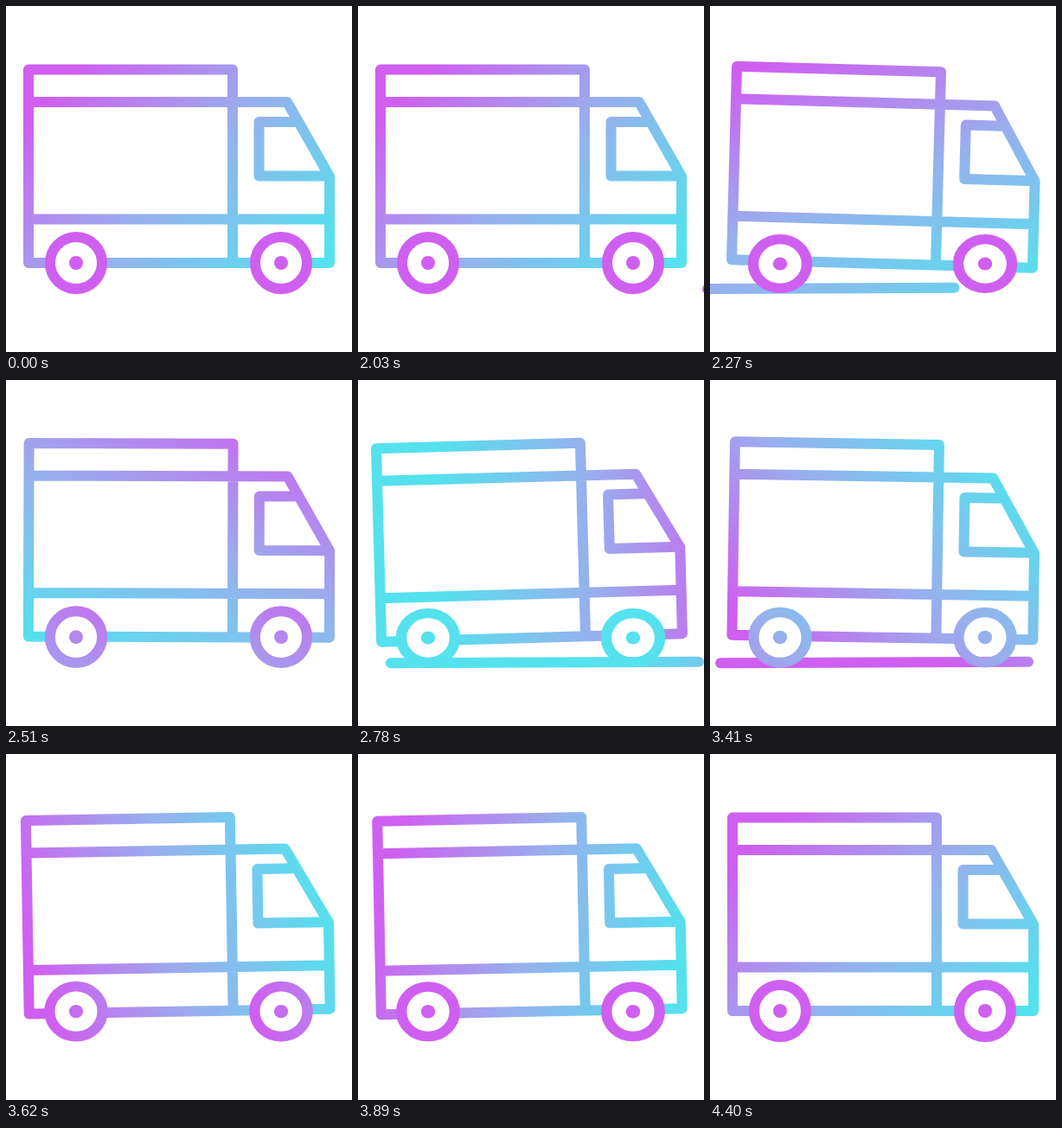
Recreate the animation shown at these times as an HTML page. Size 400 px wide and 400 px high, loop 4430 ms.

```html
<!DOCTYPE html>
<html lang="en">
<head>
<meta charset="utf-8">
<title>Delivery truck</title>
<style>
  html, body { margin: 0; width: 100%; height: 100%; overflow: hidden; background: #fff; }
  svg { display: block; width: 100%; height: 100%; }
</style>
</head>
<body>
<svg viewBox="0 0 400 400">
  <defs>
    <linearGradient id="ink" gradientUnits="userSpaceOnUse">
      <stop offset="0" stop-color="#cf5ff0"/>
      <stop offset=".5" stop-color="#97b0ed"/>
      <stop offset="1" stop-color="#55e1ee"/>
    </linearGradient>
  </defs>
  <g fill="none" stroke="url(#ink)" stroke-width="12" stroke-linejoin="round">
    <path id="road" d="M-178 327.3L178 325.7" stroke-linecap="round"/>
    <g id="body">
      <path d="M51 297H26V73.5H262V297M26 111H325L374 197V297H348M26 246.5H374M111 297H288"/>
      <path d="M335 134H292.5V196.5H374"/>
    </g>
    <g class="wheel">
      <circle r="30"/>
      <circle r="8" fill="url(#ink)" stroke="none"/>
    </g>
    <g class="wheel">
      <circle r="30"/>
      <circle r="8" fill="url(#ink)" stroke="none"/>
    </g>
  </g>
</svg>
<script>
const LOOP = 4430, REST = 2030, TILT = 1.57;
const ink = document.getElementById('ink');
const body = document.getElementById('body');
const road = document.getElementById('road');
const wheels = document.querySelectorAll('.wheel');
const wheelX = [81, 318];

// [time, value, slope]
const rock = [[0, 0, 0], [255, 1, 0], [745, -1, 0], [1235, 1, 0], [1730, -1, 0], [2130, 0, 0]];
const spin = [[0, 45, .06], [240, 67, .14], [750, 180, .23], [1380, 315, .17], [1860, 375, .09], [2370, 405, .03]];
const passes = [0, 566, 1183];
const PASS = 386;

// Cubic Hermite interpolation through the keys
function track(keys, t) {
  if (t <= keys[0][0]) return keys[0][1];
  for (let i = 1; i < keys.length; i++) {
    const [t0, a, m] = keys[i - 1], [t1, b, n] = keys[i];
    if (t <= t1) {
      const d = t1 - t0, u = (t - t0) / d, v = 1 - u;
      return v * v * (1 + 2 * u) * a + u * u * (3 - 2 * u) * b + d * u * v * (v * m - u * n);
    }
  }
  return keys[keys.length - 1][1];
}

function paintInk(t) {
  const angle = track(spin, t) * Math.PI / 180;
  const s = Math.min(1, Math.max(0, (t - 240) / 1020));
  const cx = 200 + 70 * Math.sin(Math.PI * s) ** 2;
  const dx = 175 * Math.cos(angle), dy = 175 * Math.sin(angle);
  ink.setAttribute('x1', cx - dx);
  ink.setAttribute('y1', 200 - dy);
  ink.setAttribute('x2', cx + dx);
  ink.setAttribute('y2', 200 + dy);
}

function draw(time) {
  const t = Math.max(0, time % LOOP - REST);
  const r = track(rock, t), q = Math.abs(r);

  paintInk(t);
  body.setAttribute('transform', `translate(0 ${q}) rotate(${r * TILT} 200 258)`);
  wheels.forEach((w, i) => w.setAttribute('transform',
    `translate(${wheelX[i]} ${297 + q}) scale(${1 + .035 * q} ${1 - .055 * q})`));

  const start = passes.find(p => t > p && t < p + PASS);
  const on = start !== undefined;
  road.setAttribute('visibility', on ? 'visible' : 'hidden');
  if (on) road.setAttribute('transform', `translate(${584 - 768 * (t - start) / PASS} 0)`);
}

const begin = performance.now();
function frame() {
  draw(performance.now() - begin);
  requestAnimationFrame(frame);
}
draw(0);
requestAnimationFrame(frame);
</script>
</body>
</html>
```
